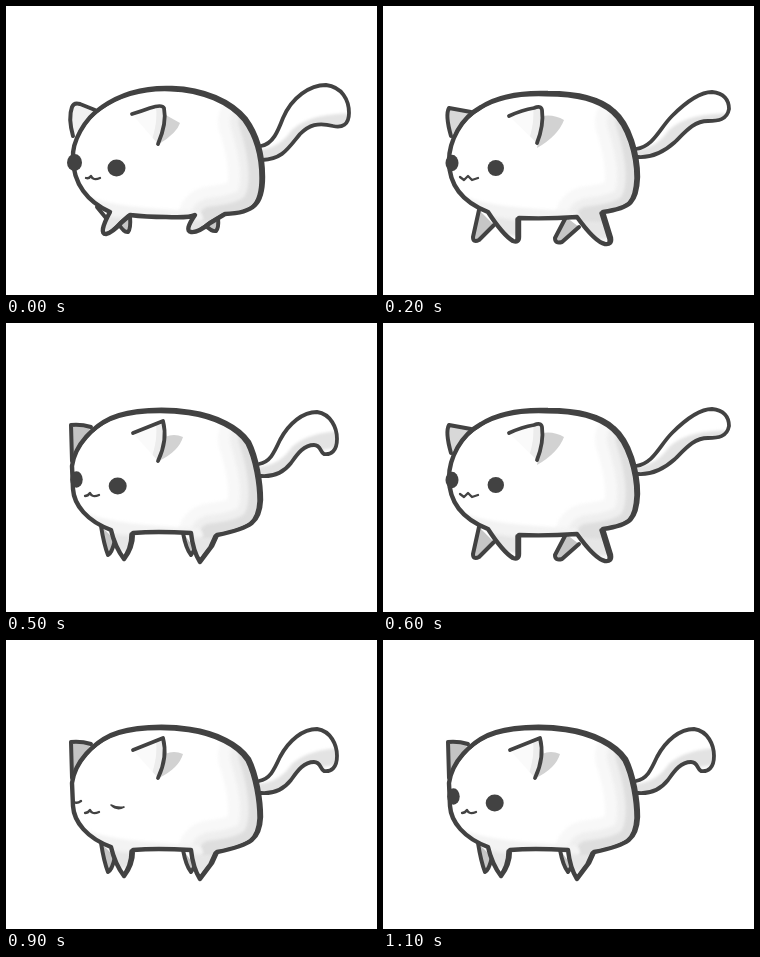
An HTML page with a canvas for the animation above (1200 ms loop, 371 by 289 pixels).

```html
<!DOCTYPE html>
<html lang="en">
<head>
<meta charset="utf-8">
<title>Walking cat</title>
<style>
html, body { margin: 0; width: 100%; height: 100%; overflow: hidden; background: #fff }
canvas { display: block }
</style>
</head>
<body>
<canvas id="stage" width="371" height="289"></canvas>
<script>
const ctx = document.getElementById('stage').getContext('2d');
const INK = '#424242';
const STEP = 100, STEPS = 12, BLINK_STEP = 9;

const crouch = {
  body: 'M67 152C66 136 78 113 96 101C116 87 141 81 166 82C198 83 225 95 240 113C253 131 257 152 257 171C257 198 248 207 219 208L204 217Q192 227 185 226Q178 225 189 209Q184 212 160 211Q140 211 124 209L116 216Q106 227 100 228Q92 228 104 206C82 196 67 178 67 152Z',
  farLegs: 'M91 201L100 212M112 217Q118 227 122 226Q125 223 124 210M199 219Q206 226 210 225Q213 222 212 212',
  leftEar: 'M67 130Q62 112 66 101Q68 96 74 98L89 104',
  earTone: '#f1f1f1',
  rightEar: 'M126 108Q136 105 144 102Q156 98 158 102Q161 117 152 138',
  earShade: 'M158 108L174 117Q171 127 153 138Z',
  tail: 'M255 140C267 138 272 125 277 112C286 91 304 79 320 79C336 81 343 94 343 107C343 119 336 122 327 120C312 116 303 119 294 128C281 144 276 153 256 154',
  leftEye: [68.5, 156.5, 7.5, 8.5],
  rightEye: [110.5, 162, 9, 8.5],
  mouth: 'M80 172Q83 173 85 170Q87 175 94 172'
};

const stand = {
  body: 'M66 143C69 121 88 103 105 95C125 86 160 85 184 89C211 93 233 104 243 119C251 135 255 160 255 177C254 199 246 205 211 212L206 223L194 239Q187 228 185 210Q150 208 127 210Q127 225 118 236Q109 224 105 207C81 198 68 182 67 166Z',
  farLegs: 'M95 203Q98 222 102 232Q106 230 109 217M177 210Q180 226 185 232L189 226',
  leftEar: 'M66 138L65 102Q75 101 85 104',
  earTone: '#c4c4c4',
  rightEar: 'M127 110L157 98Q162 117 152 138',
  earShade: 'M159 114Q168 110 177 114Q173 128 153 138Z',
  tail: 'M253 141C264 139 268 130 274 117C283 100 297 89 311 89C325 91 331 105 331 116C331 128 325 132 318 131C314 129 315 122 308 122C298 122 292 130 285 140C278 149 269 154 255 153',
  leftEye: [70.5, 156.5, 6.2, 8.2],
  rightEye: [111.7, 163, 9, 8.5],
  mouth: 'M79 173Q82 173 84 170Q86 175 93 172'
};

const stretch = {
  body: 'M66 155C66 135 78 112 98 101C115 90 139 86 165 87C195 87 217 92 231 105C247 119 255 148 255 171C254 196 248 202 220 206L228 232Q229 239 222 238Q212 236 194 211Q165 213 136 212L136 231Q136 237 130 235Q120 229 105 206C82 197 66 181 66 155Z',
  farLegs: 'M96 204L90 231Q90 237 96 234L111 219M183 211L172 232Q172 238 179 236L196 221',
  leftEar: 'M68 130Q62 109 66 102L88 106',
  earTone: '#d8d8d8',
  rightEar: 'M126 110Q139 104 151 102Q158 99 159 104Q161 119 154 137',
  earShade: 'M159 110Q171 108 181 114Q175 130 154 142Z',
  tail: 'M253 143C271 140 276 123 289 110C302 97 316 86 329 86C341 87 346 94 346 103C344 114 335 115 325 115C311 115 303 125 292 136C282 145 270 152 255 151',
  leftEye: [69, 157, 6.5, 8.3],
  rightEye: [112.8, 162, 8.2, 8],
  mouth: 'M77 171L81 174L85 170L89 174L95 172'
};

const walk = [crouch, stand, stretch, stand];

function stroke(d, width, color = INK) {
  ctx.lineWidth = width;
  ctx.strokeStyle = color;
  ctx.stroke(new Path2D(d));
}

function fill(d, color) {
  ctx.fillStyle = color;
  ctx.fill(new Path2D(d));
}

function shape(d, color, width) {
  fill(d, color);
  stroke(d, width);
}

// Runs a painting confined to a path.
function inside(d, paint) {
  ctx.save();
  ctx.clip(new Path2D(d));
  paint();
  ctx.restore();
}

function eye([x, y, rx, ry]) {
  ctx.fillStyle = INK;
  ctx.beginPath();
  ctx.ellipse(x, y, rx, ry, 0, 0, 2 * Math.PI);
  ctx.fill();
}

function shadeBody() {
  const flank = 'M245 116Q263 172 249 198Q238 210 205 213';
  ctx.filter = 'blur(1.5px)';
  stroke(flank, 66, '#f8f8f8');
  stroke(flank, 42, '#efefef');
  stroke(flank, 25, '#dedede');
  stroke('M82 198Q110 209 190 212', 14, '#f3f3f3');
  stroke('M104 218L132 222M186 222L220 224', 16, '#e6e6e6');
}

// The outline grows heavier inward along the back and the flank.
function outline(d) {
  stroke(d, 4.4);
  inside(d, () => {
    ctx.translate(-1.5, 1.2);
    stroke(d, 4.4);
  });
}

function draw(pose, blink) {
  ctx.fillStyle = '#fff';
  ctx.fillRect(0, 0, 371, 289);

  fill(pose.tail, '#fff');
  inside(pose.tail, () => {
    ctx.filter = 'blur(1.5px)';
    stroke('M256 152Q279 149 292 130Q306 117 340 116', 17, '#e3e3e3');
  });
  stroke(pose.tail, 3.8);

  shape(pose.farLegs, '#c6c6c6', 4);
  shape(pose.leftEar, pose.earTone, 4);

  fill(pose.body, '#fff');
  inside(pose.body, shadeBody);
  fill(pose.earShade, '#d2d2d2');
  outline(pose.body);
  fill(pose.rightEar, '#fafafa');
  inside(pose.rightEar, () => stroke('M157 101Q159 117 152 138', 14, '#ececec'));
  stroke(pose.rightEar, 3.8);

  if (blink) {
    stroke('M68 162Q71 164 75 161', 2.4);
    shape('M105 165Q111 168 118 167Q111 171 105 165Z', INK, 1.6);
  } else {
    eye(pose.leftEye);
    eye(pose.rightEye);
  }
  stroke(pose.mouth, 2.3);
}

function tick() {
  const step = Math.floor(performance.now() / STEP) % STEPS;
  draw(walk[step % walk.length], step === BLINK_STEP);
  requestAnimationFrame(tick);
}

ctx.lineCap = ctx.lineJoin = 'round';
tick();
</script>
</body>
</html>
```
